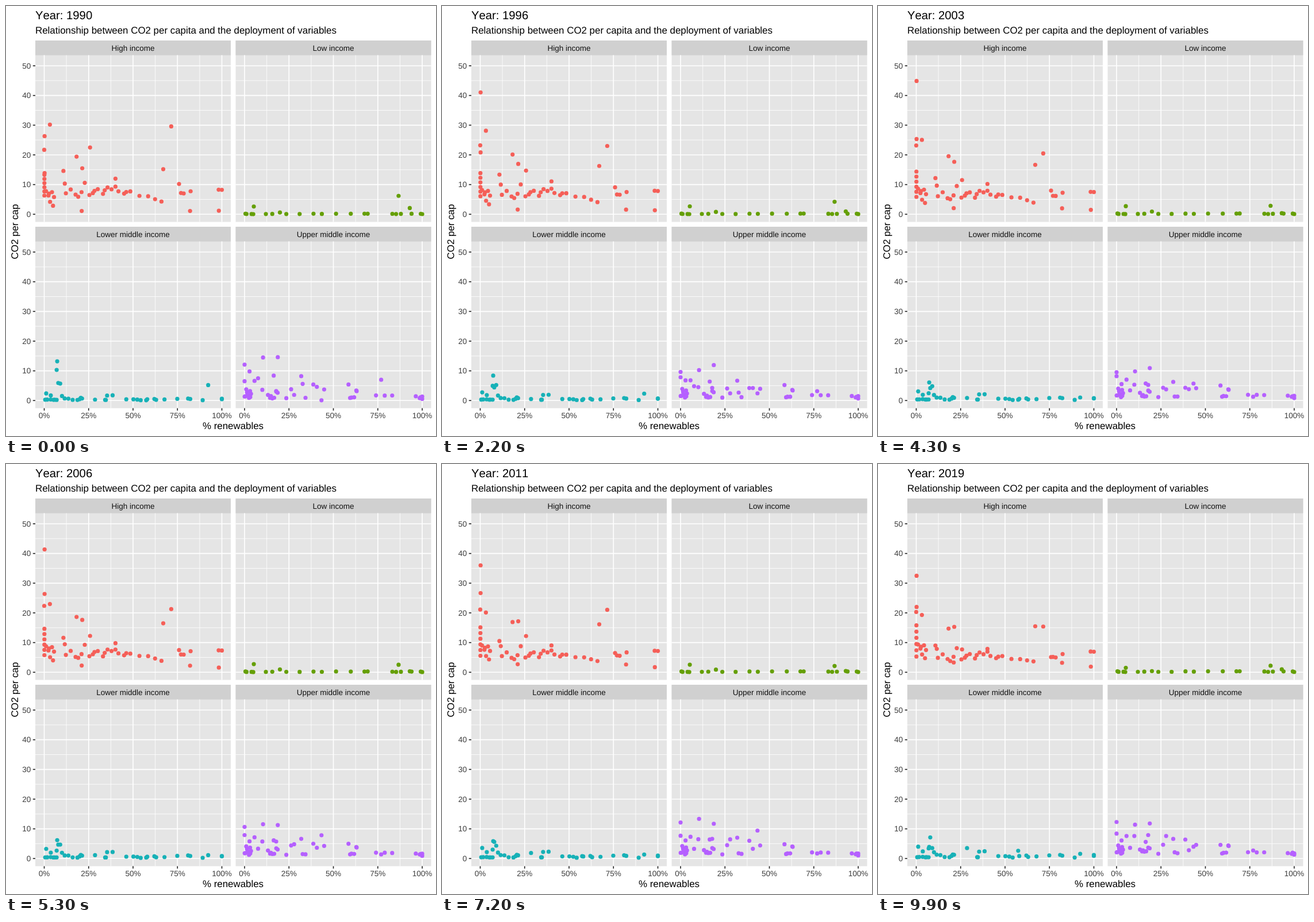
An HTML page for the animation above (10 s loop, 748x748 px).

```html
<!DOCTYPE html>
<html lang="en">
<head>
<meta charset="utf-8">
<title>CO2 and renewables</title>
<style>
  html, body { margin: 0; width: 100%; height: 100%; overflow: hidden; background: #fff; }
  svg { display: block; width: 100vw; height: 100vh; }
  text {
    font: 13.5px "Liberation Sans", Arial, sans-serif;
    font-kerning: none;
    text-rendering: geometricPrecision;
    fill: #3c3c3c;
  }
  .title { font-size: 20.28px; fill: #000; }
  .label { font-size: 16.9px; fill: #000; }
  .strip { fill: #111; }
  .mid { text-anchor: middle; }
  .end { text-anchor: end; }
  .grid { stroke: #fff; }
  .tick { stroke: #262626; stroke-width: 1.64; }
</style>
</head>
<body>
<svg id="chart" viewBox="0 0 748 748"></svg>
<script>
const svg = document.getElementById('chart');
const LAST = 99;
const points = [];

const mix = (a, b, k) => a + (b - a) * k;

let seed = 7;
function random() {
  seed = (seed * 16807) % 2147483647;
  return seed / 2147483647;
}

function add(tag, attrs, content = '') {
  const el = document.createElementNS('http://www.w3.org/2000/svg', tag);
  for (const name in attrs) el.setAttribute(name, attrs[name]);
  el.textContent = content;
  return svg.appendChild(el);
}
const text = (x, y, cls, content, extra) => add('text', { x, y, class: cls, ...extra }, content);
const line = (x1, y1, x2, y2, attrs) => add('line', { x1, y1, x2, y2, ...attrs });
const steps = (from, to, by) =>
  Array.from({ length: Math.floor((to - from) / by) + 1 }, (_, i) => from + i * by);

// n places between a and b, one at random in each equal slot
const spread = (n, a, b) => Array.from({ length: n }, (_, i) => mix(a, b, (i + random()) / n));

function facet(col, row, name, color) {
  const left = 51 + col * 348.5, top = 60 + row * 324;
  const right = left + 340, low = top + 315.6, high = top + 25.5;
  const px = v => left + 15.5 + v * 3.09;
  const py = v => top + 302.3 - v * 5.166;

  add('rect', { x: left, y: top, width: 340, height: 315.6, fill: '#e5e5e5' });
  add('rect', { x: left, y: top, width: 340, height: 25.6, fill: '#d0d0d0' });
  text(left + 170, top + 18, 'strip mid', name);

  const grid = (width, xs, ys) => {
    const attrs = { class: 'grid', 'stroke-width': width };
    ys.forEach(v => line(left, py(v), right, py(v), attrs));
    xs.forEach(v => line(px(v), high, px(v), low, attrs));
  };
  const xs = steps(0, 100, 25), ys = steps(0, 50, 10);
  grid(0.82, steps(12.5, 100, 25), steps(5, 50, 10));
  grid(1.64, xs, ys);

  if (col === 0) ys.forEach(v => {
    line(left - 4.2, py(v), left, py(v), { class: 'tick' });
    text(left - 7.8, py(v) + 4.8, 'end', v);
  });
  if (row === 1) xs.forEach(v => {
    line(px(v), low, px(v), low + 4.2, { class: 'tick' });
    text(px(v), low + 17.2, 'mid', v + '%');
  });

  // One point at x percent; its values are evenly spaced over the loop
  function dot(x, ...values) {
    const el = add('circle', { cx: px(x), r: 3.6, fill: color });
    points.push({ el, values, py });
  }
  // Points whose levels drift from one range of values to another
  function crowd(places, [lo, hi], [endLo, endHi]) {
    for (const x of places) {
      const level = random();
      const start = mix(lo, hi, level), end = mix(endLo, endHi, level);
      dot(x, start, mix(start, end, 0.3 + 0.4 * random()), end);
    }
  }
  return { dot, crowd };
}

function valueAt(values, k) {
  const pos = k * (values.length - 1);
  const i = Math.min(Math.floor(pos), values.length - 2);
  return mix(values[i], values[i + 1], pos - i);
}

const title = text(51, 23, 'title', '');
text(51, 48, 'label', 'Relationship between CO2 per capita and the deployment of variables');
text(395, 736.3, 'label mid', '% renewables');
text(0, 0, 'label mid', 'CO2 per cap', { transform: 'translate(20.6 392.5) rotate(-90)' });

const high = facet(0, 0, 'High income', '#f55f58');
high.dot(0.2, 26.3, 48.4, 36.8, 32.5);
high.dot(0.2, 13.9, 24.3, 27.7, 22);
high.dot(0, 21.7, 24, 21.3, 20.3);
high.dot(3.2, 30.2, 27.1, 20.3, 19.3);
high.dot(18.2, 19.4, 20.5, 17.4, 14.7);
high.dot(21.4, 15.5, 17.7, 17.6, 15.3);
high.dot(25.8, 22.5, 10.8, 13.2, 7.7);
high.dot(67, 15.2, 16.8, 16.3, 15.5);
high.dot(71.5, 29.6, 19.7, 22.3, 15.4);
high.dot(10.8, 14.6, 9);
high.dot(21.1, 1.1, 3.3);
high.dot(40.1, 12, 7.9);
high.dot(75.9, 10.2, 5.1);
high.dot(82.1, 1.1, 3.2);
high.dot(98.3, 1.2, 1.9);
for (let i = 0; i < 6; i++) high.dot(0.1, 6.3 + i * 1.4, 5.3 + i * 2.1);
high.crowd(spread(7, 1, 6), [2.5, 9.5], [4.4, 11]);
high.crowd(spread(20, 10, 49), [5.6, 11], [3.5, 8.5]);
high.crowd([53.6, 58.5, 62.4, 66], [4.1, 6.5], [3.6, 4.6]);
high.crowd([77, 78.5, 82.4, 98.2, 100], [6.8, 8.4], [4.6, 7.2]);

const low = facet(1, 0, 'Low income', '#659f06');
low.dot(5.2, 2.6, 2.7, 2.8, 1.5);
low.dot(19.9, 0.6, 0.9, 1, 0.4);
low.dot(86.7, 6.2, 3.2, 2.1, 2.2);
low.dot(93, 2.1, 0.4, 0.3, 1);
low.crowd([0.5, 1.1, 3.9, 4.9, 12, 15.6, 23.5, 31, 38.8, 43.5, 51.5, 59.8,
  67.5, 69.3, 83.2, 85.3, 88, 94, 99.2, 100], [0.05, 0.2], [0.1, 0.35]);

const lower = facet(0, 1, 'Lower middle income', '#17b1b7');
lower.dot(7.3, 13.2, 6, 6.3, 3.9);
lower.dot(7, 10.3, 2.3, 2.9, 3.4);
lower.dot(7.9, 5.9, 3.7, 5.3, 7.1);
lower.dot(9, 5.7, 5, 4.5, 3.5);
lower.dot(28.6, 0.3, 0.6, 1.5, 3.5);
lower.dot(57.4, 0.1, 0.2, 0.4, 2.6);
lower.dot(92.3, 5.2, 0.9, 1.3, 1.6);
lower.dot(1.1, 2.4, 4);
lower.crowd([3.7, 10, 20.6, 35.4, 38.5], [0.9, 1.8], [1.3, 2.5]);
lower.crowd(spread(6, 0, 8), [0.1, 0.5], [0.3, 0.7]);
lower.crowd([11.5, 13.6, 16, 18.7, 19.9, 21.3, 34.3, 34.7, 46.2, 50.2, 52.4, 54.3, 58,
  62, 63, 67.7, 74.9, 81, 82.2, 89.2, 100, 100], [0.1, 0.7], [0.3, 1.3]);

const upper = facet(1, 1, 'Upper middle income', '#b560ff');
upper.dot(0, 12.1, 8.4, 12.1, 12.3);
upper.dot(0, 6.5, 8.5, 7.5, 8.4);
upper.dot(2.8, 9.8, 5.3, 6.1, 6.1);
upper.dot(7.6, 7.5, 3.5, 3.2, 3.6);
upper.dot(10.4, 14.5, 8.1, 13.8, 11.4);
upper.dot(16.4, 8.4, 5.4, 6.6, 5.6);
upper.dot(18.7, 14.6, 10.6, 11.7, 11.8);
upper.dot(27.9, 1.9, 2.7, 6.2, 7.6);
upper.dot(31.9, 8.2, 5.9, 7.1, 6.6);
upper.dot(32.7, 5.6, 1.2, 1.7, 2.1);
upper.dot(38.7, 5.4, 3.6, 5.9, 6.4);
upper.dot(43.3, 0.1, 3.6, 10.6, 4);
upper.dot(76.9, 7, 1.2, 1.5, 2.7);
upper.dot(5.6, 6.6, 7.6);
upper.dot(10, 3.6, 7.6);
upper.dot(17.8, 3.2, 7.9);
upper.dot(40.7, 4.6, 2.8);
upper.dot(58.5, 5.4, 4.6);
upper.crowd(spread(9, 0, 4), [0.7, 3.8], [1.5, 4.4]);
upper.crowd(spread(7, 13, 19), [0.7, 3.2], [2.3, 3.8]);
upper.crowd([26.2, 44.8, 62.9, 63.1], [2.6, 4], [3.8, 4.8]);
upper.crowd([23.5, 34.3, 59.4, 60.2, 61.7, 98.6, 99.1, 100], [0.5, 1.1], [1.2, 2]);
upper.crowd([74, 78.9, 83.1, 96.4, 100], [1.3, 1.8], [1.7, 2.2]);

function draw() {
  const k = Math.floor(performance.now() % 10000 / 100) / LAST;
  title.textContent = 'Year: ' + Math.round(1990 + 29 * k);
  for (const { el, values, py } of points) el.setAttribute('cy', py(valueAt(values, k)));
  requestAnimationFrame(draw);
}
draw();
</script>
</body>
</html>
```
